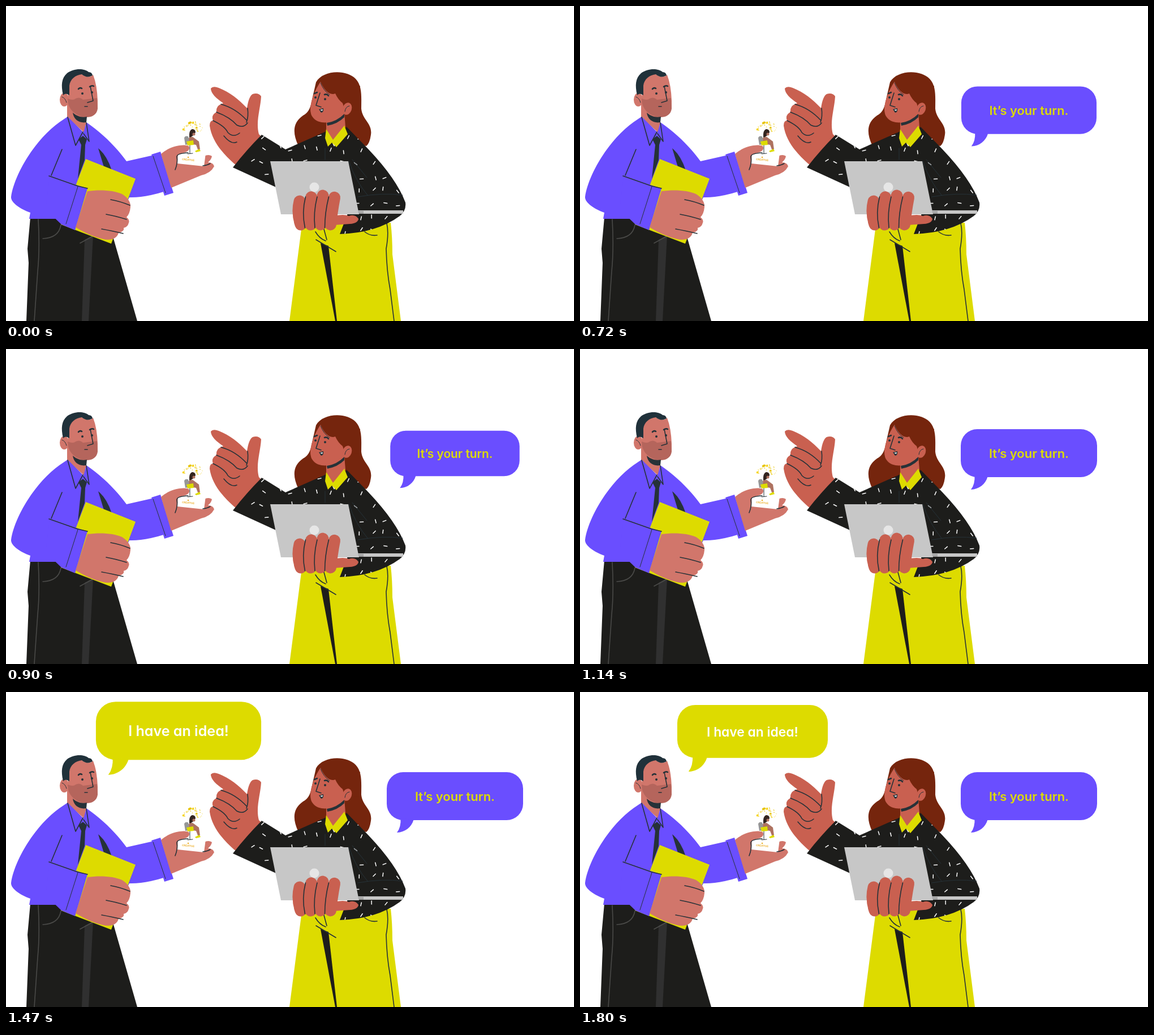
An HTML page that plays this animation: 1004x558 px, repeating every 2.28 s.

```html
<!DOCTYPE html>
<html lang="en">
<head>
<meta charset="utf-8">
<title>It's your turn</title>
<style>
  html, body { margin: 0; width: 100%; height: 100%; overflow: hidden; background: #fff; }
  svg { display: block; width: 100%; height: 100%; }
  text { font-family: Inter, sans-serif; font-weight: 600; font-feature-settings: "cv11"; text-anchor: middle; }
  .purple { fill: #6a4eff; }
  .yellow { fill: #dddb00; }
  .black { fill: #1d1d1b; }
  .navy { fill: #263238; }
  .his { fill: #d1766b; }
  .her { fill: #c96050; }
  .hair { fill: #75250d; }
  .grey { fill: #c7c7c7; }
  .line { fill: none; stroke: #263238; stroke-width: 1.6; stroke-linecap: round; stroke-linejoin: round; }
  .bold { stroke-width: 2.6; }
  .fine { stroke-width: 1; }
  .seam { stroke: #4a4a48; }
  .finger { fill: none; stroke: #c96050; stroke-width: 21; stroke-linecap: round; }
  .fleck { stroke: #fff; stroke-width: 1.5; stroke-linecap: round; }
</style>
</head>
<body>
<svg viewBox="0 0 1004 558">
  <defs>
    <g id="balloon">
      <rect x="-120.5" y="-53.5" width="241" height="85" rx="29"/>
      <path d="M-73 31C-77 44-88 53-102.500 53.500Q-95 44-96 28Z"/>
    </g>
    <path id="jacket" d="M566 222L494 254L452 228Q425 255 401 286L475 320L605 365L590 404Q655 402 696 372Q708 362 706 348Q690 305 637 250L602 214L580 249Z"/>
    <clipPath id="cloth"><use href="#jacket"/></clipPath>
  </defs>

  <g id="man">
    <path class="black" d="M43 375H100L190 412L232 558H36L40 455L38 430Z"/>
    <path fill="#303030" d="M139 414L154 406L146 558H134Z"/>
    <path class="line seam" d="M57 378Q60 430 56 470L50 558M97 388Q93 411 65 412M131 420L153 408"/>

    <path class="his" d="M108 162V197L138 224L142 206V188Z"/>
    <path class="purple" d="M109 196L137 224L142 206C170 225 195 250 213 275L262 264L282 328Q245 340 218 339L188 402L98 377H41L43 366C25 360 8 348 9 338C14 300 52 232 103 200Z"/>
    <path class="purple" d="M257 263L273 258L296 331L280 336Z"/>
    <path class="line fine" d="M260 266L282 331"/>
    <path class="navy" d="M128 236L136 230L143 236L140 246L139 273L127 306L133 246ZM163 252Q178 264 187 291L173 285Z"/>
    <path class="line" d="M109 197L123 247L136 223M142 207L147 240L137 226M99 254L80 300"/>

    <path class="yellow" d="M141 271L229 306L186 421L97 387Z"/>
    <path class="purple" d="M77 302L128 318L144 323L122 397L98 387L70 360Z"/>
    <path class="line" d="M76 301L127 319L144 323"/>
    <path class="line fine" d="M127 320L106 386"/>
    <path class="his" d="M144 328C165 325 190 326 205 333C213 338 221 346 220 356Q219 368 213 374Q219 379 217 384Q215 392 208 393Q210 399 199 402C196 412 185 416 172 413C155 409 140 402 123 392Z"/>
    <g id="knuckles"></g>

    <ellipse class="his" cx="103" cy="166" rx="8" ry="12"/>
    <path class="line fine" d="M99 161Q105 163 107 171"/>
    <path class="his" d="M110 138C114 125 128 119 134 121C142 127 150 126 154 122Q161 140 162 168V182L109 176Z"/>
    <path fill="#b5655c" d="M109 164Q119 168 123 164Q130 160 136 166L161 163L162 182C160 196 146 199 134 196C121 192 113 184 110 173Z"/>
    <path fill="#20313a" d="M101 158C97 140 98 128 108 119C120 110 138 110 146 117Q152 117 153 123C146 127 140 126 134 121C123 122 113 130 112 141V158Q105 153 101 158Z"/>
    <path class="navy" d="M118 189C126 196 135 198 143 196L142 206C130 208 120 202 118 189Z"/>
    <path class="line" d="M149 142L154 168L144 171M139 178H144"/>
    <path class="line bold" d="M128 147Q131 144 134 146M148 143Q152 140 155 142"/>
    <circle class="navy" cx="135" cy="155" r="2"/><circle class="navy" cx="152" cy="153" r="2"/>

    <path class="his" d="M274 262C290 249 305 245 322 248L340 270L350 266Q358 262 364 266Q363 272 357 277Q366 277 368 284Q362 296 345 300L292 322Z"/>
    <path fill="#fff" d="M304 262L326 246L354 253L350 284L303 279Z"/>
    <path class="his" d="M290 256C302 246 313 245 323 248Q327 255 317 259L302 264L300 279L284 280Z"/>
    <path class="line" d="M322 260Q302 261 302 267Q304 278 299 290M348 283Q356 282 361 279"/>
  </g>

  <g id="idea">
    <g id="sparks"></g>
    <path fill="#969696" d="M315 234Q316 229 322 231L326 245L317 246Z"/>
    <path fill="#ae7260" d="M323 234Q328 229 333 234L341 240L343 254H339L336 246L324 244Z"/>
    <path class="yellow" d="M319 240L331 238L332 246L321 247ZM334 257L342 253L344 257L336 259Z"/>
    <path fill="#332520" d="M324 233Q323 220 329 218Q335 218 335 224Q331 231 324 233Z"/>
    <circle cx="332" cy="227" r="2.500" fill="#ae7260"/>
    <path class="line fine" d="M325 247V261M321 262L330 261"/>
    <text x="322" y="274" font-size="4.500" fill="#eba818" transform="rotate(5 322 274)">CREATIVE</text>
    <circle cx="322" cy="268" r="1.200" fill="#eba818"/>
  </g>

  <g id="woman">
    <path class="hair" d="M548 135C560 113 602 112 618 129C630 142 628 160 628 182C630 202 648 208 645 228Q643 243 637 248L600 242L516 246C507 226 506 207 525 194Q537 188 540 170Z"/>
    <path class="yellow" d="M523 388L680 384Q683 410 683 440L698 558H501Z"/>
    <path class="black" d="M556 420L570 425L585 558H582Z"/>
    <path class="line" d="M548 414L583 435M547 400Q554 412 565 416M560 388L567 414M634 400Q644 408 656 406M673 385Q677 402 672 430Q673 470 679 502L686 558"/>

    <path class="her" d="M566 203L598 188L600 214L577 240L566 218Z"/>
    <path class="navy" d="M567 207Q584 205 598 191V197Q586 209 568 212Z"/>
    <path class="her" d="M362 146Q366 141 376 145C396 153 411 165 426 181Q429 160 436 156Q446 153 451 160C450 181 441 205 447 227L460 240L418 290L403 279C384 262 364 240 360 212Q360 203 366 203Q362 193 372 188Q371 177 380 174L384 172C372 164 362 155 362 146Z"/>
    <path class="line" d="M380 174Q406 181 426 203M372 188Q396 197 408 211Q420 217 427 207M366 203Q387 213 392 224Q402 234 413 225M427 181Q429 196 425 206M385 230Q398 246 408 241"/>

    <use href="#jacket" class="black"/>
    <g id="flecks" clip-path="url(#cloth)"></g>
    <path class="yellow" d="M566 218L578 237L598 212L604 227L584 250L576 242L569 249L564 234Z"/>
    <path class="line fine" d="M606 275Q618 310 639 335M612 272L638 304M622 338Q667 330 701 335M564 252V272"/>

    <path class="her" d="M538 182C539 166 546 149 556 134L594 158L598 190L580 202C573 208 551 209 543 198Q538 193 538 182Z"/>
    <path class="hair" d="M556 134C562 150 573 159 582 155Q587 166 595 172L599 184L626 186V142L600 124L568 120Z"/>
    <ellipse class="her" cx="603" cy="182" rx="8" ry="11" transform="rotate(18 603 182)"/>
    <path class="line fine" d="M599 187Q600 178 607 177M556 136Q561 150 572 157"/>
    <path class="line" d="M555 154L548 176L557 179"/>
    <path class="line bold" d="M545 155L550 153M563 157Q567 155 570 159"/>
    <circle class="navy" cx="547" cy="162" r="2"/><circle class="navy" cx="564" cy="165" r="2"/>
    <path class="navy" d="M553 183L561 181Q562 188 557 189Z"/>
    <path fill="#fff" d="M555 184L560 183L559 186Z"/>

    <path class="grey" d="M467 275H605L624 369H486ZM622 362H702V368H622Z"/>
    <path fill="#a5a5a5" d="M622 363H632V368H624Z"/>
    <circle cx="545" cy="321" r="8.500" fill="#e6e6e6"/>
    <path class="her" d="M578 372Q598 368 606 372Q617 368 623 377Q622 385 608 386L580 388Z"/>
    <g id="fingers"></g>
  </g>

  <g id="reply">
    <use href="#balloon" class="purple"/>
    <text y="-3" font-size="22" class="yellow">It’s your turn.</text>
  </g>
  <g id="opening">
    <use href="#balloon" class="yellow"/>
    <text y="-3" font-size="20.700" fill="#fff">I have an idea!</text>
  </g>
</svg>

<script>
const LOOP = 2280, STEP = 30;
const byId = id => document.getElementById(id);

function fill(id, count, shape) {
  byId(id).innerHTML = Array.from({ length: count }, (_, i) => shape(i)).join("");
}

let seed = 7;
function random() {
  seed = (seed * 16807) % 2147483647;
  return seed / 2147483647;
}

// Fabric pattern: a jittered grid, clipped to the jacket.
const COLUMNS = 13, GAP = 24;
fill("flecks", COLUMNS * 9, i => {
  const x = 402 + (i % COLUMNS + 0.5 * random()) * GAP;
  const y = 224 + (Math.floor(i / COLUMNS) + 0.5 * random()) * GAP;
  return `<path class="fleck" d="M-3 0H3" transform="translate(${x} ${y}) rotate(${180 * random()})"/>`;
});

// Dots fan upwards from the seated figure's head.
fill("sparks", 34, i => {
  const angle = -Math.PI * (0.05 + 0.9 * random()), radius = 9 + 13 * random();
  const x = 331 + radius * 0.85 * Math.cos(angle), y = 225 + radius * Math.sin(angle);
  const color = ["#f5d311", "#e6c300", "#f7e58a"][i % 3];
  return `<circle cx="${x}" cy="${y}" r="${i % 4 ? 0.8 : 1.9}" fill="${color}"/>`;
});

fill("knuckles", 3, i =>
  `<path class="line" d="M${185 - 8 * i} ${343 + 26 * i}q17 3 ${34 + 2 * i} ${10 - i}"/>`);

// Each finger grips the laptop; a dark crease parts it from the one before.
fill("fingers", 4, i => {
  const top = 519 + 20.500 * i, bottom = 521 + 17.500 * i;
  const reach = 346 - 10 * Math.sin(0.8 * i);
  const crease = i ? `<path class="line" d="M${top - 10} 338Q${top - 17} 366 ${bottom - 10} 393"/>` : "";
  return `<path class="finger" d="M${top} ${reach}Q${top - 5} 366 ${bottom} 387"/>${crease}`;
});

const clamp = u => Math.min(1, Math.max(0, u));
const swing = u => (1 - Math.cos(Math.PI * u)) / 2;

// Grow past full size, dip below it, then settle.
function pop(t) {
  if (t <= 0) return 0;
  if (t < 275) return 1.1 * (1 - (1 - t / 275) ** 1.61);
  if (t < 380) return 1.1 - 0.152 * swing((t - 275) / 105);
  return 0.948 + 0.052 * swing(clamp((t - 380) / 220));
}

function place(id, x, y, scale) {
  byId(id).setAttribute("transform", `translate(${x} ${y}) scale(${scale})`);
}

function draw(now) {
  const t = Math.floor((now % LOOP + 0.01) / STEP) * STEP;
  place("reply", 793.5, 195.5, pop(t - 510));
  place("opening", 305, 82, 1.104 * pop(t - 1200));
}

const start = performance.now();
function frame() {
  draw(performance.now() - start);
  requestAnimationFrame(frame);
}
frame();
</script>
</body>
</html>
```
